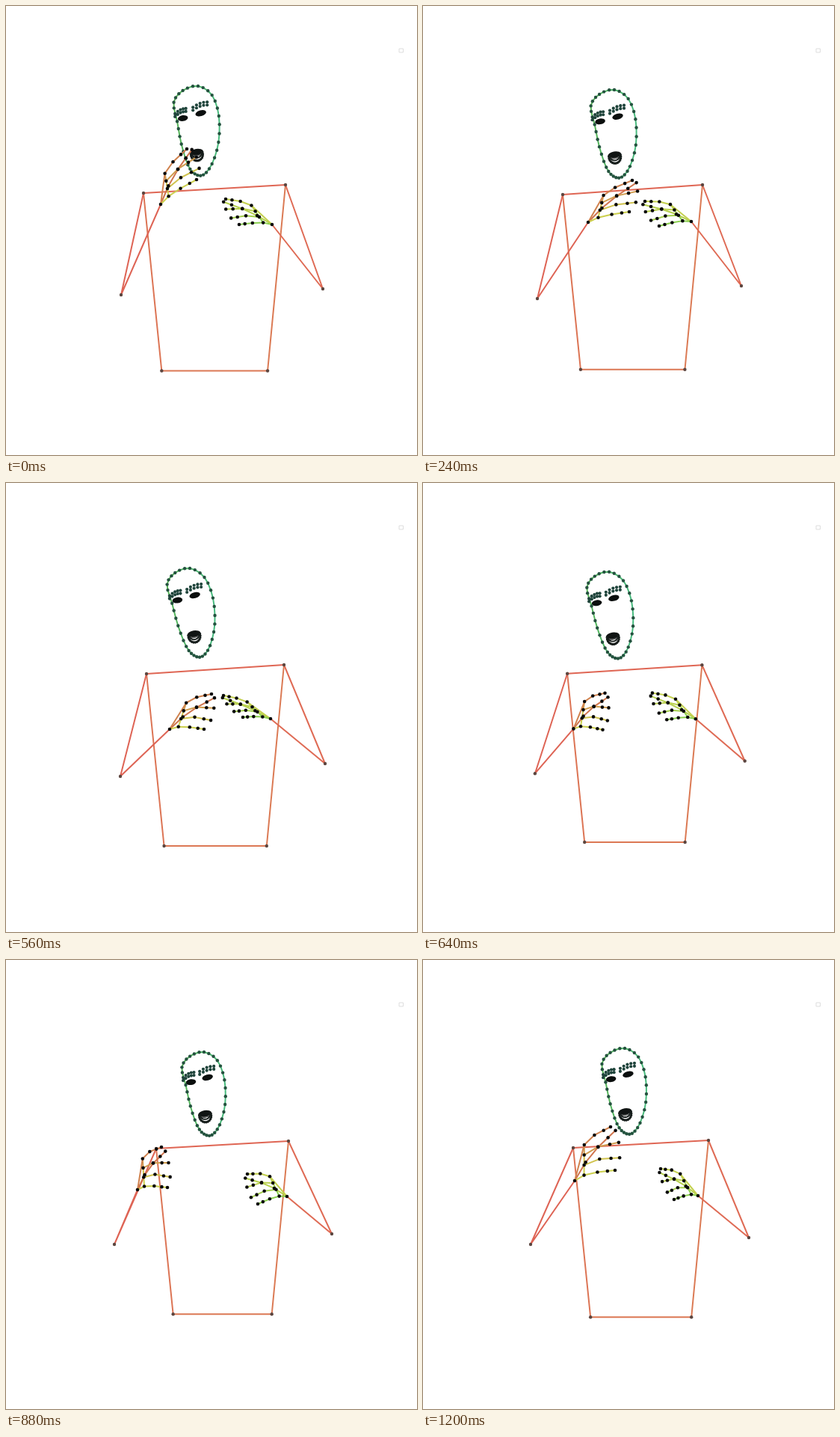
Recreate the animation shown at these times as an HTML page with a canvas. Size 550 by 600 pixels, loop 1280 ms.

```html
<!DOCTYPE html>
<html lang="en">
<head>
<meta charset="utf-8">
<title>Signing skeleton</title>
<style>
html, body { margin: 0; width: 100%; height: 100%; overflow: hidden; background: #fff; }
canvas { display: block; }
</style>
</head>
<body>
<canvas id="stage" width="550" height="600"></canvas>
<script>
const ctx = document.getElementById('stage').getContext('2d');
const LOOP = 1280, STEP = 80;
const keys = [];

// shoulders, elbows, head (crown, chin), hands (wrist, index tip, little tip)
const pose = (time, shoulders, elbows, head, left, right) =>
  keys.push({ time, shoulders, elbows, head, left, right });

pose(0, [184, 250, 374, 239], [154, 386, 424, 378], [257, 107, 259, 228],
  [207, 265, 242, 191, 255, 232], [356, 292, 294, 258, 312, 292]);
pose(240, [187, 252, 374, 239], [153, 391, 426, 374], [256, 112, 261, 231],
  [221, 289, 280, 233, 276, 275], [359, 288, 297, 261, 316, 294]);
pose(400, [183, 253, 371, 240], [157, 393, 422, 377], [249, 110, 260, 231],
  [228, 307, 288, 254, 283, 298], [347, 302, 284, 273, 311, 301]);
pose(560, [188, 255, 372, 243], [153, 392, 427, 375], [246, 114, 258, 234],
  [219, 329, 275, 282, 265, 329], [354, 315, 291, 284, 317, 313]);
pose(720, [198, 254, 375, 243], [147, 384, 434, 368], [254, 123, 263, 237],
  [184, 323, 213, 273, 218, 324], [375, 314, 322, 277, 335, 319]);
pose(880, [201, 252, 378, 242], [145, 380, 436, 366], [265, 123, 271, 236],
  [176, 307, 208, 250, 216, 304], [376, 316, 323, 286, 337, 326]);
pose(1200, [201, 251, 382, 241], [144, 380, 436, 371], [270, 118, 275, 234],
  [203, 295, 251, 223, 257, 281], [368, 315, 318, 279, 336, 320]);

// Head outline: [sideways offset, share of the way from crown to chin]
const RIM = [[0, 0], [18, 0.1], [26.5, 0.33], [25.5, 0.62], [16.5, 0.86], [5, 0.98],
  [-6, 0.97], [-15, 0.87], [-23, 0.64], [-28, 0.39], [-32, 0.18], [-20, 0.05]];

const hermite = (a, b, ta, tb, u) => {
  const v = u * u, w = v * u;
  return (2 * w - 3 * v + 1) * a + (w - 2 * v + u) * ta + (3 * v - 2 * w) * b + (w - v) * tb;
};
const mix = (p, q, u) => p.map((c, k) => c + (q[k] - c) * u);

// Smooth path through the key poses, as a list of [x, y]
function sample(part, time) {
  let i = 0;
  while (i < keys.length - 2 && time >= keys[i + 1].time) i++;
  const a = keys[i], b = keys[i + 1];
  const prev = keys[Math.max(i - 1, 0)], next = keys[Math.min(i + 2, keys.length - 1)];
  const span = b.time - a.time;
  const flat = a[part].map((p, n) => {
    const q = b[part][n];
    const ta = (q - prev[part][n]) * span / (b.time - prev.time);
    const tb = (next[part][n] - p) * span / (next.time - a.time);
    return hermite(p, q, ta, tb, (time - a.time) / span);
  });
  const pts = [];
  for (let n = 0; n < flat.length; n += 2) pts.push([flat[n], flat[n + 1]]);
  return pts;
}

function line(pts, color, width = 2, close = false) {
  ctx.beginPath();
  pts.forEach(p => ctx.lineTo(...p));
  if (close) ctx.closePath();
  ctx.strokeStyle = color;
  ctx.lineWidth = width;
  ctx.stroke();
}

function dots(pts, color, r) {
  ctx.fillStyle = color;
  for (const [x, y] of pts) {
    ctx.beginPath();
    ctx.arc(x, y, r, 0, 7);
    ctx.fill();
  }
}

function blob(x, y, rx, ry, tilt, color) {
  ctx.beginPath();
  ctx.ellipse(x, y, rx, ry, tilt, 0, 7);
  ctx.fillStyle = color;
  ctx.fill();
}

// Hips hang below the shoulders in proportion to the shoulder width
function drawBody([ls, rs], [le, re], lw, rw) {
  const w = rs[0] - ls[0], hipY = ls[1] + 1.25 * w;
  const lh = [ls[0] + 0.128 * w, hipY], rh = [rs[0] - 0.126 * w, hipY];
  line([ls, lh], '#dc7454');
  line([rs, rh], '#db7a54');
  line([lh, rh], '#dc7854');
  line([ls, rs], '#df6654');
  line([ls, le, lw], '#de6455');
  line([rs, re, rw], '#df6b55');
  dots([ls, rs, le, re, lh, rh], '#5c4640', 2.2);
}

// Joints are placed on the skewed axes wrist-to-index-tip and wrist-to-little-tip
function drawHand([wrist, index, little], hues) {
  const at = (a, b) => wrist.map((c, k) => c + a * (index[k] - c) + b * (little[k] - c));
  const finger = (base, mid, tip) => [base, mid, mix(mid, tip, 0.57), tip];
  const fingers = [finger(at(0.35, -0.04), at(0.62, 0.03), at(0.89, 0.22))];
  for (let i = 0; i < 4; i++) {
    const s = 1 - i / 3;
    fingers.push(finger(
      at(0.07 + 0.68 * s, 0.17 - 0.6 * s),
      at(0.06 + 0.85 * s, 0.51 - 0.83 * s ** 1.3),
      at(s ** 1.25, 1 - s * s)));
  }
  const tint = i => `hsl(${hues[i]} 58% 56%)`;
  for (let i = 2; i < 5; i++) line([fingers[i - 1][0], fingers[i][0]], tint(i));
  for (const i of [0, 1, 4]) line([wrist, fingers[i][0]], tint(i));
  fingers.forEach((f, i) => line(f, tint(i)));
  dots([wrist, ...fingers.flat()], '#0a0a0a', 2.3);
}

// Closed smooth curve with three dots per key point
function outline(pts) {
  const n = pts.length, out = [];
  for (let i = 0; i < n; i++) {
    const [p, a, b, q] = [n - 1, 0, 1, 2].map(k => pts[(i + k) % n]);
    for (let s = 0; s < 3; s++)
      out.push([0, 1].map(k => hermite(a[k], b[k], (b[k] - p[k]) / 2, (q[k] - a[k]) / 2, s / 3)));
  }
  return out;
}

function drawEye([x, y], rx, tilt, browWidth, lift) {
  for (const row of [0, 1]) {
    const brow = Array.from({ length: 5 }, (_, i) => {
      const t = i / 4;
      return [x - 10.5 + browWidth * t, y - lift + 7 * (1 - t) ** 2 + 4 * row];
    });
    dots(brow, '#1f443b', 2.1);
  }
  blob(x, y, rx, 3.9, tilt, '#0b0f0e');
}

function drawMouth([x, y]) {
  const arc = (rx, ry, from, to) => Array.from({ length: 13 }, (_, i) => {
    const a = from + (to - from) * i / 12;
    return [rx * Math.cos(a), ry * Math.sin(a)];
  });
  ctx.save();
  ctx.translate(x, y);
  ctx.rotate(-0.16);
  blob(0, -2.5, 9.2, 5, 0, '#101413');
  const lower = arc(8, 8.5, -0.2, Math.PI + 0.2);
  line(lower, '#1b2422', 1.5);
  dots(lower, '#161d1b', 1.7);
  line(arc(6, 4.5, 0, Math.PI), '#161d1b', 2);
  line(arc(5, 1.5, 0.3, Math.PI - 0.3), '#999', 0.8);
  ctx.restore();
}

function drawHead([crown, chin]) {
  const size = (chin[1] - crown[1]) / 118;
  const at = ([u, v]) => {
    const [x, y] = mix(crown, chin, v);
    return [x + u * size, y];
  };
  const rim = outline(RIM.map(at));
  const fade = ctx.createLinearGradient(crown[0] - 32, 0, crown[0] + 32, 0);
  fade.addColorStop(0, '#58b556');
  fade.addColorStop(1, '#48bb80');
  line(rim, fade, 2, true);
  dots(rim, '#24523f', 2.2);
  drawEye(at([-20.5, 0.355]), 6.8, -0.14, 14.5, 13);
  drawEye(at([3, 0.3]), 7.4, -0.26, 19, 15);
  drawMouth(at([-3, 0.755]));
}

function draw(time) {
  ctx.fillStyle = '#fff';
  ctx.fillRect(0, 0, 550, 600);
  ctx.lineJoin = ctx.lineCap = 'round';
  ctx.strokeStyle = '#ddd';
  ctx.lineWidth = 1;
  ctx.strokeRect(526.5, 57, 5, 5);

  const left = sample('left', time), right = sample('right', time);
  drawBody(sample('shoulders', time), sample('elbows', time), left[0], right[0]);
  drawHead(sample('head', time));
  drawHand(left, [18, 24, 36, 54, 62]);
  drawHand(right, [72, 66, 70, 80, 92]);
}

function tick() {
  const t = performance.now() % LOOP;
  draw(Math.floor(t / STEP) * STEP);
  requestAnimationFrame(tick);
}
tick();
</script>
</body>
</html>
```
